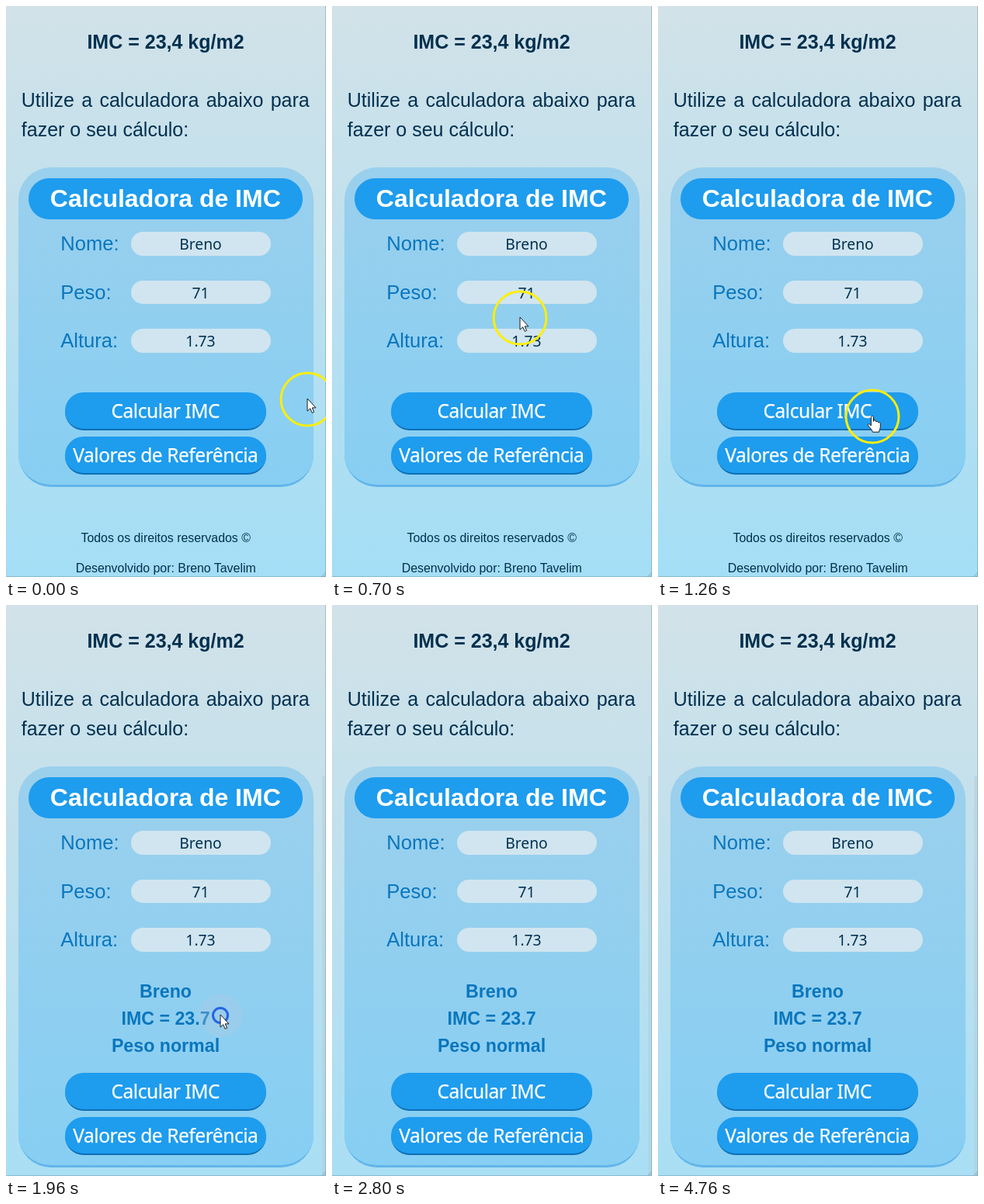
Write an HTML page that moves like this. It is 412x736 px and loops after 4850 ms.

```html
<!DOCTYPE html>
<html lang="pt-BR">
<head>
<meta charset="utf-8">
<title>Calculadora de IMC</title>
<style>
  html, body { margin: 0; width: 100%; height: 100%; overflow: hidden; }
  #stage { position: relative; width: 412px; height: 736px; overflow: hidden; }
  #stage > *, .shift > div { position: absolute; box-sizing: border-box; }

  /* every part shares one clock and changes in hard steps */
  .page, .panel, .shift, .before, .after, .pointer, .ring, .click, .halo, .arrow, .hand {
    animation: 4850ms step-end infinite;
  }

  .page {
    left: 0; top: 0; width: 412px; height: 745px;
    background: linear-gradient(#d2e2e8, #a3def6);
    animation-name: page;
  }
  .panel {
    left: 15.5px; top: 207.5px; width: 380px; height: 412px;
    border-radius: 42px; border-bottom: 3px solid #62b5ea;
    background: rgba(32, 157, 238, .26);
    animation-name: panel;
  }
  .heading {
    left: 28.5px; top: 222px; width: 353.5px; height: 53px;
    border-radius: 27px; background: #1e9cee;
  }
  .field {
    left: 160.5px; width: 180.5px; height: 30.5px;
    border-radius: 16px; background: #d0e5ef;
  }
  .shift { left: 0; top: 0; animation-name: shift; }
  .button {
    left: 76px; width: 259px; height: 49px;
    border-radius: 24px; border-bottom: 2px solid #0e6fb4;
    background: #1e9cee;
  }
  .edge {
    inset: 0; border: solid rgba(110, 145, 165, .45);
    border-width: 0 1px 1px 0;
  }
  .bar { left: 407px; top: 220px; width: 4px; height: 516px; background: rgba(175, 200, 210, .4); }

  svg { left: 0; top: 0; overflow: hidden; }
  text { font-family: "Liberation Sans", Arial, sans-serif; fill: #02304f; }
  .mid { text-anchor: middle; }
  .bold { font-weight: 700; }
  .body { font-size: 25px; }
  .title { font-size: 32px; fill: #fff; }
  .label { font-size: 25.6px; fill: #0a76bd; }
  .result { font-size: 23.2px; fill: #0a76bd; }
  .foot { font-size: 15.9px; }
  .value { font: 19.3px "Noto Sans", "Open Sans", sans-serif; }
  .caption {
    font: 24.5px "Noto Sans", "Open Sans", sans-serif; letter-spacing: -.45px;
    fill: #fff; stroke: #fff; stroke-width: .25;
  }

  .before { animation-name: before; }
  .after { animation-name: after; }
  .pointer { animation-name: pointer; }
  .ring { animation-name: ring; fill: none; stroke: #fdee08; stroke-width: 3; }
  .click { animation-name: click; fill: none; stroke: #2463e8; stroke-width: 3; }
  .halo { animation-name: halo; fill: #b4cbe0; }
  .arrow { animation-name: arrow; }
  .hand { animation-name: hand; }
  .arrow, .hand { fill: #fff; stroke: #1a1a1a; stroke-width: 1; stroke-linejoin: round; }

  /* the result appears at 1960 ms */
  @keyframes page { 0% { height: 745px; } 40.412%, 100% { height: 850px; } }
  @keyframes panel { 0% { height: 412px; } 40.412%, 100% { height: 517px; } }
  @keyframes shift { 0% { transform: none; } 40.412%, 100% { transform: translateY(105px); } }
  @keyframes before { 0% { opacity: 1; } 40.412%, 100% { opacity: 0; } }
  @keyframes after { 0% { opacity: 0; } 40.412%, 100% { opacity: 1; } }

  @keyframes pointer {
    0% { transform: translate(388px, 507px); }
    2.887% { transform: translate(373px, 497px); }
    5.773% { transform: translate(337px, 472px); }
    8.66% { transform: translate(294px, 440px); }
    11.546% { transform: translate(258px, 414px); }
    14.433% { transform: translate(242px, 402px); }
    17.32% { transform: translate(246px, 420px); }
    20.206% { transform: translate(258px, 465px); }
    23.093% { transform: translate(270px, 509px); }
    25.979% { transform: translate(276px, 529px); }
    51.959% { transform: translate(318px, 574px); }
    54.845% { transform: translate(388px, 668px); }
    57.732%, 100% { transform: translate(500px, 800px); }
  }
  @keyframes ring {
    0% { opacity: 1; }
    40.412% { opacity: 0; }
    46.186%, 100% { opacity: 1; }
  }
  @keyframes click {
    0% { opacity: 0; r: 9.5px; }
    40.412% { opacity: 1; r: 9.5px; }
    43.299% { opacity: .5; r: 19px; }
    46.186%, 100% { opacity: 0; r: 19px; }
  }
  @keyframes halo {
    0% { opacity: 0; }
    40.412% { opacity: .3; }
    43.299% { opacity: .12; }
    46.186%, 100% { opacity: 0; }
  }
  @keyframes hand { 0% { opacity: 0; } 25.979% { opacity: 1; } 40.412%, 100% { opacity: 0; } }
  @keyframes arrow { 0% { opacity: 1; } 25.979% { opacity: 0; } 40.412%, 100% { opacity: 1; } }
</style>
</head>
<body>
<div id="stage">
  <div class="page"></div>
  <div class="panel"></div>
  <div class="heading"></div>
  <div class="field" style="top:291px"></div>
  <div class="field" style="top:353.5px"></div>
  <div class="field" style="top:416px"></div>
  <div class="shift">
    <div class="button" style="top:498px"></div>
    <div class="button" style="top:554.5px"></div>
  </div>
  <div class="edge"></div>
  <div class="bar after"></div>

  <svg width="412" height="736" viewBox="0 0 412 736">
    <text class="body bold mid" x="205.5" y="55">IMC = 23,4 kg/m2</text>
    <text class="body" x="19.8" y="129.7" word-spacing="2.4">Utilize a calculadora abaixo para</text>
    <text class="body" x="19.8" y="167.7">fazer o seu cálculo:</text>
    <text class="title bold mid" x="205.3" y="259">Calculadora de IMC</text>

    <text class="label" x="70.2" y="315">Nome:</text>
    <text class="label" x="70.2" y="377.5">Peso:</text>
    <text class="label" x="70.2" y="440">Altura:</text>
    <text class="value mid" x="250.5" y="314">Breno</text>
    <text class="value mid" x="250.5" y="376.5">71</text>
    <text class="value mid" x="250.5" y="439">1.73</text>

    <g class="after">
      <text class="result bold mid" x="205.5" y="506">Breno</text>
      <text class="result bold mid" x="205.5" y="541">IMC = 23.7</text>
      <text class="result bold mid" x="205.5" y="576">Peso normal</text>
    </g>
    <g class="shift">
      <text class="caption mid" x="205.3" y="531.3">Calcular IMC</text>
      <text class="caption mid" x="205.3" y="587.8">Valores de Referência</text>
    </g>
    <g class="before">
      <text class="foot mid" x="205.7" y="691">Todos os direitos reservados ©</text>
      <text class="foot mid" x="205.7" y="730">Desenvolvido por: Breno Tavelim</text>
    </g>
    <path d="M406 736l6-6M409 736l3-3" stroke="#7f9aa8" stroke-width=".8"/>

    <g class="pointer">
      <circle class="halo" r="28"/>
      <circle class="ring" r="34"/>
      <circle class="click" r="9.5"/>
      <path class="arrow" d="M0-1V15.2L3.7 11.8L6.2 17.4L8.6 16.3L6.2 10.9H11Z"/>
      <path class="hand" d="M-1.7 1.2C-1.7-1 1.5-1 1.5 1.2V6.5C2-.2 2 5.3 3 5.3C4.5 5.3 4.7 6.2 4.8 7C6 6 7.4 6.5 7.6 7.9C9 7.2 10.3 8 10.3 9.5V13.5C10.3 16 8.8 17 8.6 20.2H.3C0 17.5-3.7 14.5-5.6 11.6C-6.3 10-4.3 9-3 10.5L-1.7 12Z"/>
    </g>
  </svg>
</div>
</body>
</html>
```
